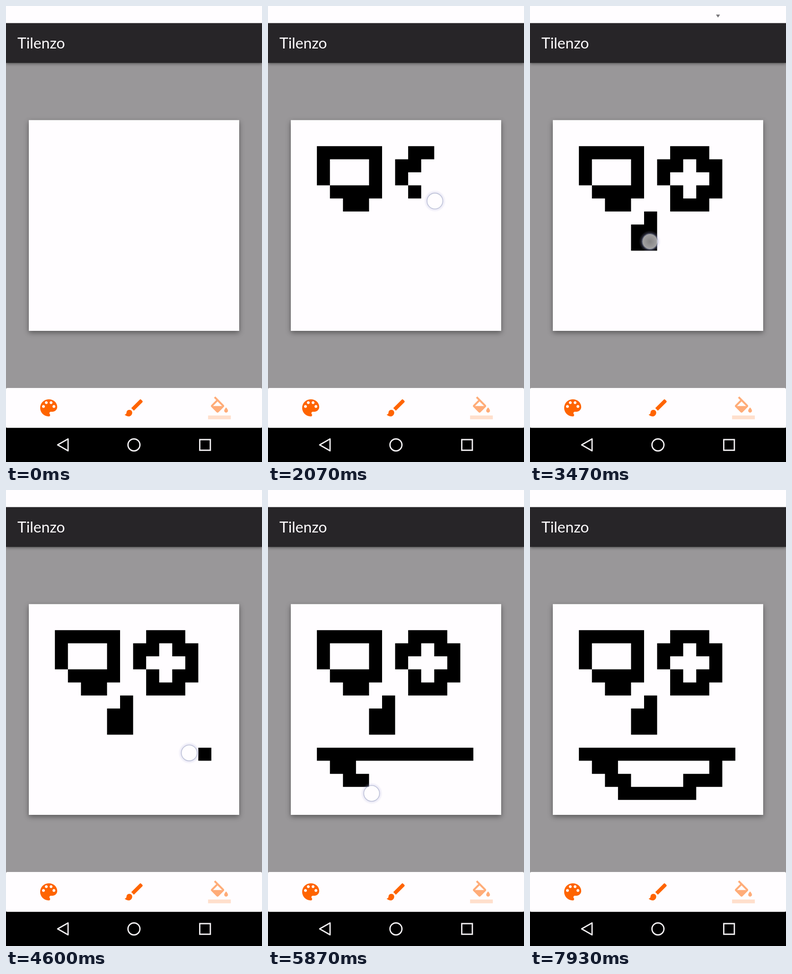
An HTML page for the animation above (8000 ms loop, 561 px wide and 998 px high).

```html
<!DOCTYPE html>
<html lang="en">
<head>
<meta charset="utf-8">
<title>Pixel drawing app</title>
<style>
  html, body { margin: 0; width: 100%; height: 100%; overflow: hidden; background: #999799; }
  svg { display: block; width: 100vw; height: 100vh; }
  .bar { filter: drop-shadow(0 2px 3px rgba(0, 0, 0, .4)); }
  .paper { filter: drop-shadow(0 4px 6px rgba(0, 0, 0, .42)); }
</style>
</head>
<body>
<svg viewBox="0 0 561 998">
  <defs>
    <radialGradient id="disc">
      <stop offset="0" stop-color="#fffdff" stop-opacity=".52"/>
      <stop offset="1" stop-color="#fffdff" stop-opacity=".64"/>
    </radialGradient>
    <radialGradient id="glow">
      <stop offset=".7" stop-color="#a6a6d8" stop-opacity="0"/>
      <stop offset=".72" stop-color="#a6a6d8" stop-opacity=".28"/>
      <stop offset="1" stop-color="#a6a6d8" stop-opacity="0"/>
    </radialGradient>
  </defs>
  <rect width="561" height="998" fill="#999799"/>

  <rect class="bar" y="37" width="561" height="87.6" fill="#272528"/>
  <rect width="561" height="37.4" fill="#fffdff"/>
  <path id="signal" d="M407.5 18.7h9l-4.5 6.5z" fill="#777579"/>
  <text x="25" y="93" fill="#fffdff" font-size="33" font-family="Lato, sans-serif">Tilenzo</text>

  <rect class="paper" x="50" y="249.7" width="461" height="461.3" fill="#fffdff"/>
  <path id="ink"/>

  <rect y="923" width="561" height="75"/>
  <rect y="836" width="561" height="87.2" rx="3.2" fill="#fffdff"/>
  <g fill="#ff6400">
    <path transform="translate(68.6 854.6) scale(2.08)" d="M12 3c-4.97 0-9 4.03-9 9s4.03 9 9 9c.83 0 1.5-.67 1.5-1.5 0-.39-.15-.74-.39-1.01-.23-.26-.38-.61-.38-.99 0-.83.67-1.5 1.5-1.5H16c2.76 0 5-2.24 5-5 0-4.42-4.03-8-9-8zm-5.5 9c-.83 0-1.5-.67-1.5-1.5S5.67 9 6.5 9 8 9.67 8 10.5 7.33 12 6.5 12zm3-4C8.67 8 8 7.33 8 6.5S8.67 5 9.5 5s1.5.67 1.5 1.5S10.33 8 9.5 8zm5 0c-.83 0-1.5-.67-1.5-1.5S13.67 5 14.5 5s1.5.67 1.5 1.5S15.33 8 14.5 8zm3 4c-.83 0-1.5-.67-1.5-1.5S16.67 9 17.5 9s1.5.67 1.5 1.5-.67 1.5-1.5 1.5z"/>
    <path transform="translate(255.8 854.6) scale(2.08)" d="M7 14c-1.66 0-3 1.34-3 3 0 1.31-1.16 2-2 2 .92 1.22 2.49 2 4 2 2.21 0 4-1.79 4-4 0-1.66-1.34-3-3-3zm13.71-9.37l-1.34-1.34c-.39-.39-1.02-.39-1.41 0L9 12.25 11.75 15l8.96-8.96c.39-.39.39-1.02 0-1.41z"/>
    <g transform="translate(442.8 854.6) scale(2.08)">
      <path opacity=".53" d="M16.56 8.94L7.62 0 6.21 1.41l2.38 2.38-5.15 5.15c-.59.59-.59 1.54 0 2.12l5.5 5.5c.29.29.68.44 1.06.44s.77-.15 1.06-.44l5.5-5.5c.59-.58.59-1.53 0-2.12zM5.21 10L10 5.21 14.79 10H5.21zM19 11.5s-2 2.17-2 3.5c0 1.1.9 2 2 2s2-.9 2-2c0-1.33-2-3.5-2-3.5z"/>
      <path opacity=".2" d="M0 20h24v4H0z"/>
    </g>
  </g>
  <g fill="none" stroke="#f1eff1" stroke-width="2.9" stroke-linejoin="round">
    <path d="M113.2 960.6L136 947.6V973.6z"/>
    <circle cx="280.4" cy="960.6" r="13.1"/>
    <path stroke-linejoin="miter" d="M424.6 949h23.2v23.2h-23.2z"/>
  </g>

  <g id="touch">
    <circle r="24" fill="url(#glow)"/>
    <circle r="16.5" fill="url(#disc)"/>
    <circle r="17.2" fill="none" stroke="#8c96b8" stroke-opacity=".5" stroke-width="1.6"/>
  </g>
</svg>
<script>
const LOOP = 8000, FPS = 15;
const CELL = 200 / 7, LEFT = 50, TOP = 249.7;
const INK_DELAY = 120; // ink trails the finger
const SAMPLES = 20;    // finger positions per cell

// Evenly spaced finger positions along a line through the given corners
function trace(corners) {
  const points = [];
  corners.slice(1).forEach(([x1, y1], i) => {
    const [x0, y0] = corners[i];
    const n = Math.ceil(Math.hypot(x1 - x0, y1 - y0) * SAMPLES);
    for (let k = 0; k < n; k++) points.push([x0 + (x1 - x0) * k / n, y0 + (y1 - y0) * k / n]);
  });
  return [...points, corners[corners.length - 1]];
}

// Corners are [column, row] on the pixel grid
const stroke = (start, duration, lift, ...corners) =>
  ({ start, duration, lift, points: trace(corners) });

const strokes = [
  // left eye
  stroke(325, 600, 1260, [5, 2], [2, 2], [2, 4], [4, 6], [5, 6], [4, 5], [6, 5], [5.55, 2.13]),
  // right eye
  stroke(1595, 700, 2520, [10, 2], [9, 2], [9, 3], [8, 3], [8, 4], [9, 5], [9, 5.7],
    [11, 5.7], [11, 5], [12, 5], [12, 3], [11, 3], [10.51, 2]),
  // nose
  stroke(2925, 390, 3720, [6.9, 7.15], [7, 8], [6, 8], [6, 9], [6.95, 8.8]),
  // upper lip
  stroke(4460, 650, 5300, [12.85, 10.9], [2.33, 10.9]),
  // lower lip
  stroke(5300, 1030, 6520, [2.33, 10.9], [3, 12], [4, 12], [4, 13], [5, 13], [5, 14],
    [10, 14], [10, 13], [12, 13], [12.1, 11.6])
];

// Positions passed by time t; the finger speeds up along each stroke
function passed({ start, duration, points }, t) {
  if (t < start) return [];
  const u = Math.min(1, (t - start) / duration);
  return points.slice(0, 1 + Math.floor(u ** 1.5 * (points.length - 1)));
}

function square([col, row]) {
  const x = LEFT + CELL * Math.round(col), y = TOP + CELL * Math.round(row);
  return `M${x} ${y}h${CELL}v${CELL}h${-CELL}z`;
}

const el = id => document.getElementById(id);
const ink = el('ink'), touch = el('touch'), signal = el('signal');
const show = (node, on) => node.setAttribute('visibility', on ? 'visible' : 'hidden');

function draw(time) {
  const t = Math.floor((time + 5) * FPS / 1000) * 1000 / FPS;

  const squares = new Set(strokes.flatMap(s => passed(s, t - INK_DELAY).map(square)));
  ink.setAttribute('d', [...squares].join(''));

  const active = strokes.find(s => t >= s.start && t < s.lift);
  show(touch, active);
  if (active) {
    const [col, row] = passed(active, t).pop();
    touch.setAttribute('transform',
      `translate(${LEFT + CELL * (col + .5)} ${TOP + CELL * (row + .5)})`);
  }
  show(signal, t > 3060 && t < 4060);
}

const start = performance.now();
function tick() {
  draw((performance.now() - start) % LOOP);
  requestAnimationFrame(tick);
}
tick();
</script>
</body>
</html>
```
